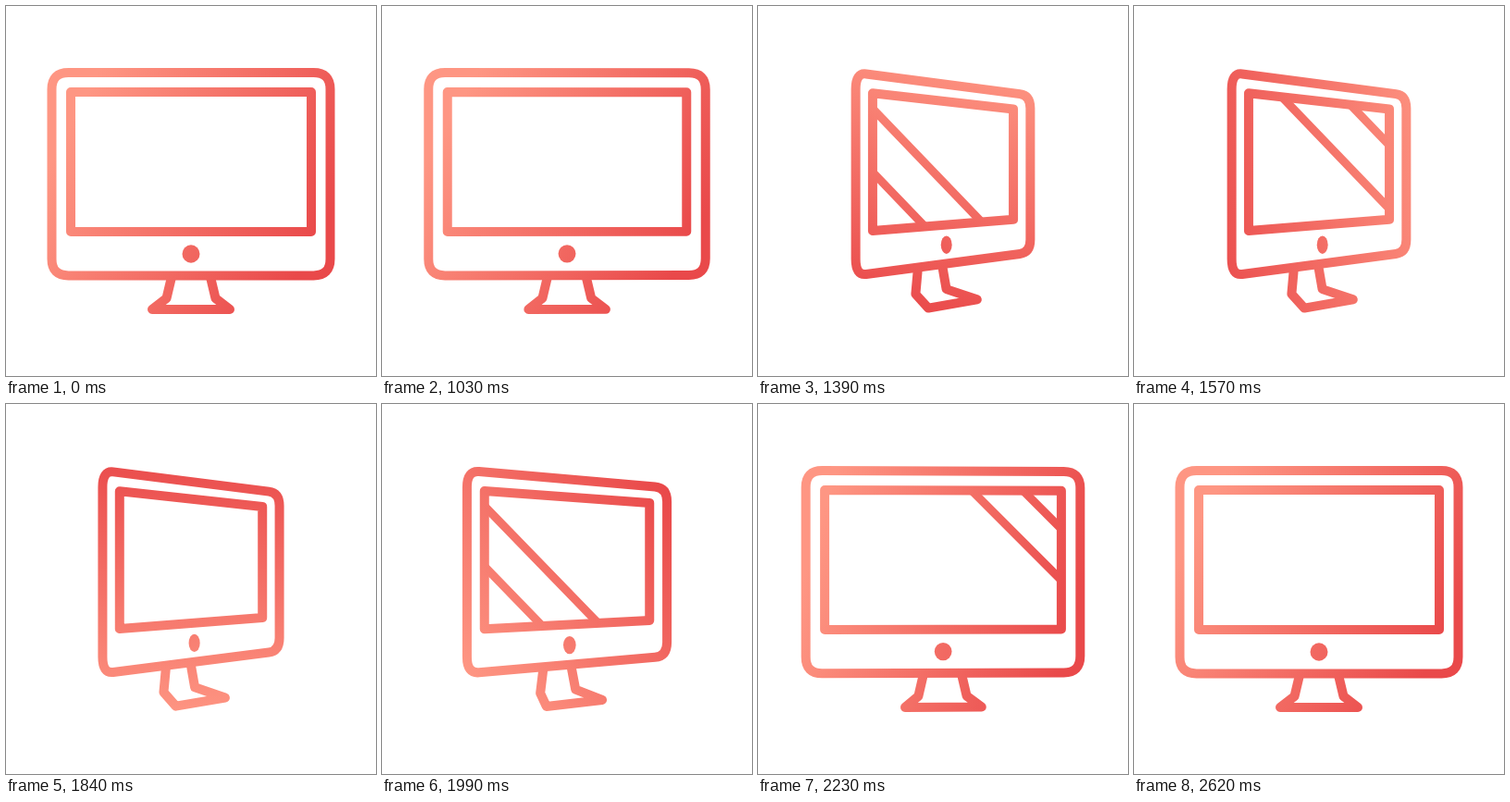
These frames come from a looping animation (400x400 px, 2650 ms). An HTML page:

```html
<!DOCTYPE html>
<html lang="en">
<head>
<meta charset="utf-8">
<title>Turning monitor</title>
<style>
html, body { margin: 0; width: 100%; height: 100%; overflow: hidden; background: #fff; }
svg { display: block; width: 100vw; height: 100vh; }
</style>
</head>
<body>
<svg viewBox="0 0 400 400">
  <defs>
    <linearGradient id="tint" gradientUnits="userSpaceOnUse">
      <stop offset="0" stop-color="#fe9683"/>
      <stop offset="1" stop-color="#e9494a"/>
    </linearGradient>
    <clipPath id="glass"><path id="pane"/></clipPath>
  </defs>
  <g fill="none" stroke="url(#tint)" stroke-width="10" stroke-linejoin="round" stroke-linecap="round">
    <path id="shine" clip-path="url(#glass)" stroke-width="9"/>
    <path id="stand"/>
    <path id="body"/>
    <path id="screen"/>
    <ellipse id="dot" fill="url(#tint)" stroke="none"/>
  </g>
</svg>
<script>
const LOOP = 2650, REST = 1000, STEP = 30;
const CX = 200, HORIZON = 181, SQUEEZE = 0.373;
const clamp = x => Math.min(1, Math.max(0, x));
const mix = (a, b, p) => a + (b - a) * p;

function set(id, attrs) {
  const node = document.getElementById(id);
  for (const name in attrs) node.setAttribute(name, attrs[name]);
}

// Turns a point by p: narrower overall, shorter towards the right; dx, dy shift parts at another depth.
function project(x, y, p, squeeze = SQUEEZE, dx = 0, dy = 0) {
  const far = (x - 50) / 300;
  return [
    CX + (x - CX) * (1 - squeeze * p) + dx * p,
    HORIZON + (y - HORIZON) * (1 - 0.225 * p * far) + dy * p
  ];
}

const box = (half, top, bottom) => [
  [CX - half, top], [CX + half, top], [CX + half, bottom], [CX - half, bottom]
];

const toward = ([x, y], [tx, ty], r) => [x + Math.sign(tx - x) * r, y + Math.sign(ty - y) * r];

function bodyPath(p) {
  const corners = box(150.5, 72, 291.4);
  const at = pt => project(...pt, p).join(" ");
  return corners.map((c, i) => {
    const a = toward(c, corners[(i + 3) % 4], 18);
    const b = toward(c, corners[(i + 1) % 4], 18);
    return `${i ? "L" : "M"}${at(a)}Q${at(c)} ${at(b)}`;
  }).join("") + "Z";
}

const screenPath = p =>
  "M" + box(130, 93, 244).map(([x, y]) => project(x, y, p, 0.415).join(" ")).join("L") + "Z";

function standPath(p) {
  const side = s => [
    project(CX + s * 21, 293, p, SQUEEZE, -14, 2),
    project(CX + s * 26.5, 316, p, SQUEEZE, -13, 8),
    project(CX + s * 42, 328, p, SQUEEZE, 10.5, 10.5)
  ];
  return "M" + [...side(-1), ...side(1).reverse()].map(pt => pt.join(" ")).join("L");
}

function shinePath(k, p) {
  const mid = k < 26 ? 213 + 19 * (k - 13) : 278 + 25 * (k - 36);
  const half = mix(27.5, 33, p), slope = mix(1, 0.96, p);
  const line = x => `M${x - slope * 178} 60L${x + slope * 32} 270`;
  return line(mid - half) + line(mid + half);
}

const easeInOut = x => x < 0.5 ? 16 * x ** 5 : 1 - 16 * (1 - x) ** 5;

function turn(k) {
  return k < 20 ? 1 - Math.exp(-((k / 5.56) ** 2.5)) : 1 - easeInOut(clamp((k - 20) / 30));
}

function tintAxis(k) {
  const u = k > 0 ? clamp((k + 1) / 47) : 0;
  const a = (28 + 360 * u * u * (3 - 2 * u)) * Math.PI / 180;
  const dx = 146 * Math.cos(a), dy = 146 * Math.sin(a);
  return { x1: CX - dx, y1: 195 - dy, x2: CX + dx, y2: 195 + dy };
}

function draw(ms) {
  const k = Math.max(0, Math.floor((ms - REST) / STEP));
  const p = turn(k);
  const screen = screenPath(p);
  const [cx, cy] = project(CX, 268, p, SQUEEZE, 3.7);
  set("screen", { d: screen });
  set("pane", { d: screen });
  set("stand", { d: standPath(p) });
  set("body", { d: bodyPath(p) });
  set("dot", { cx, cy, rx: 9.5 * (1 - SQUEEZE * p), ry: 9.7 });
  set("shine", { d: shinePath(k, p) });
  set("tint", tintAxis(k));
}

const start = performance.now();
function tick() {
  draw((performance.now() - start) % LOOP);
  requestAnimationFrame(tick);
}
draw(0);
requestAnimationFrame(tick);
</script>
</body>
</html>
```
